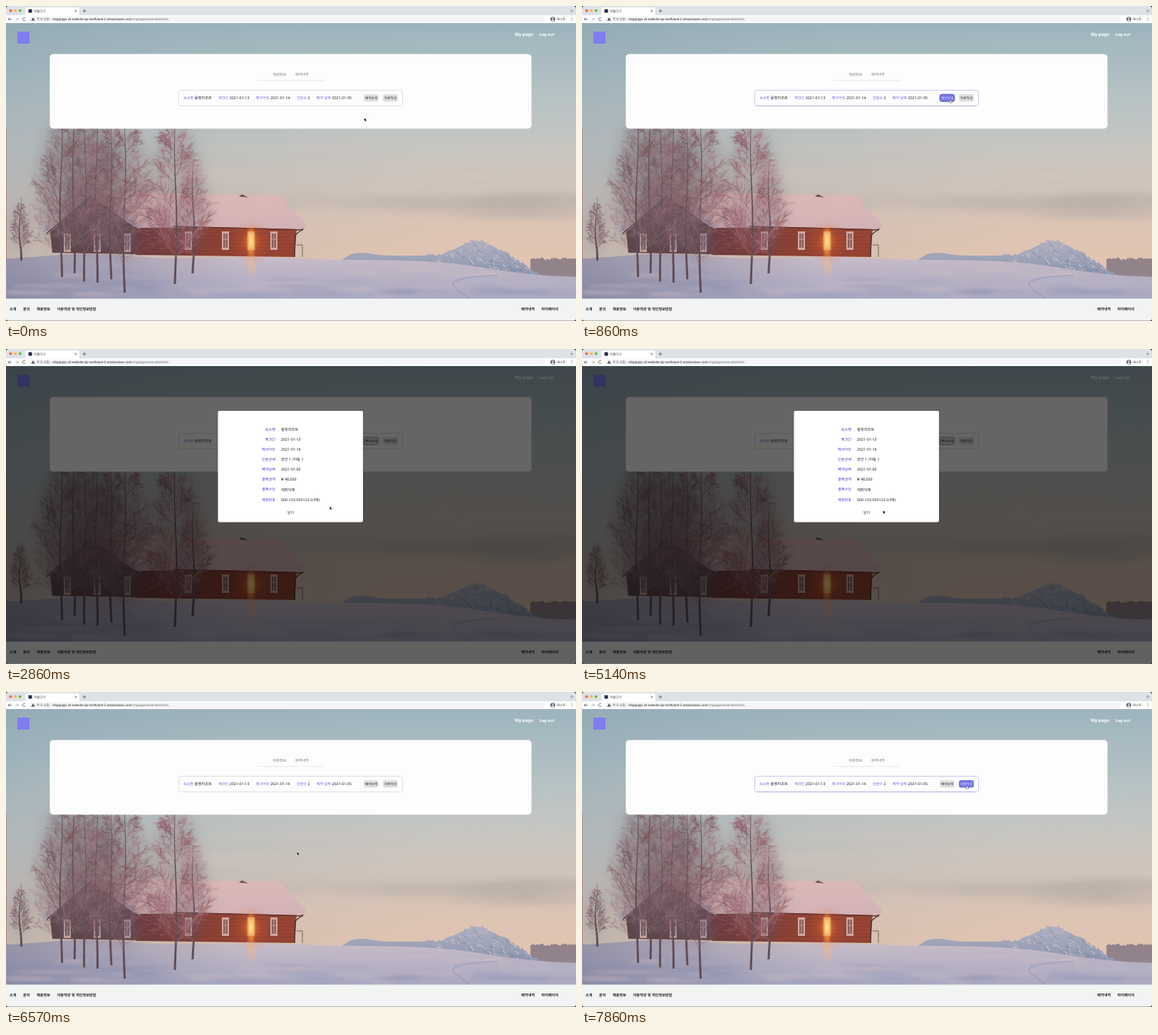
An HTML page with a canvas that plays this animation: 800x443 px, repeating every 8000 ms.

```html
<!DOCTYPE html>
<html lang="ko">
<head>
<meta charset="utf-8">
<style>
html, body { margin: 0; width: 100%; height: 100%; overflow: hidden; background: #333; }
canvas { display: block; border-radius: 4px; }
</style>
</head>
<body>
<canvas id="stage" width="800" height="443"></canvas>
<script>
const LOOP = 8000, STEP = 1000 / 7;
const SANS = '"Noto Sans", "Noto Sans CJK KR", "Noto Sans CJK", sans-serif';
const UI = 'Roboto, "Noto Sans CJK KR", "Noto Sans CJK", sans-serif';
const PURPLE = '#7476e6', LABEL = '#6a5ae0', INK = '#1a1a1a';

const screen = document.getElementById('stage').getContext('2d');
const photo = document.createElement('canvas');
photo.width = 800;
photo.height = 443;
let c = photo.getContext('2d');

let seed = 7;
const rand = () => (seed = seed * 16807 % 2147483647) / 2147483647;
const between = (a, b) => a + (b - a) * rand();
const pick = (a, b) => rand() < 0.5 ? a : b;
const bump = (x, centre, width) => Math.exp(-(((x - centre) / width) ** 2));

function gradient(x0, y0, x1, y1, ...colors) {
  const g = c.createLinearGradient(x0, y0, x1, y1);
  colors.forEach((color, i) => g.addColorStop(i / (colors.length - 1), color));
  return g;
}
function rect(x, y, w, h, fill) {
  c.fillStyle = fill;
  c.fillRect(x, y, w, h);
}
function box(x, y, w, h, r, fill, stroke, width = 0.7) {
  c.beginPath();
  c.roundRect(x, y, w, h, r);
  if (fill) { c.fillStyle = fill; c.fill(); }
  if (stroke) { c.strokeStyle = stroke; c.lineWidth = width; c.stroke(); }
}
function trace(pts) {
  c.beginPath();
  for (let i = 0; i < pts.length; i += 2) c.lineTo(pts[i], pts[i + 1]);
}
function poly(fill, ...pts) {
  trace(pts);
  c.fillStyle = fill;
  c.fill();
}
function line(color, width, ...pts) {
  trace(pts);
  c.strokeStyle = color;
  c.lineWidth = width;
  c.stroke();
}
function disc(x, y, rx, fill, ry = rx) {
  c.beginPath();
  c.ellipse(x, y, rx, ry, 0, 0, 7);
  c.fillStyle = fill;
  c.fill();
}
// Fills everything between the curve y = top(x) and the line y = bottom
function land(fill, x0, x1, bottom, top) {
  const pts = [x0, bottom];
  for (let x = x0; x <= x1; x += 2) pts.push(x, top(x));
  poly(fill, ...pts, x1, bottom);
}
function soft(blur, count, blob) {
  c.filter = `blur(${blur}px)`;
  for (let i = 0; i < count; i++) blob();
  c.filter = 'none';
}
// y is the vertical centre of the line; returns the right end of the text
function text(str, x, y, size, color = INK, { weight = 400, align = 'left', font = SANS } = {}) {
  c.font = `${weight} ${size}px ${font}`;
  c.textAlign = align;
  c.fillStyle = color;
  c.fillText(str, x, y + size * 0.36);
  return x + c.measureText(str).width;
}

// ---- winter scene ----
const ridge = x => 351 - 22 * bump(x, 660, 34) - 4 * bump(x, 500, 20)
  + 0.6 * Math.max(0, x - 705) + 0.5 * Math.max(0, 484 - x);
const snowline = x => 357 - 8 * bump(x, 110, 90) - 4 * bump(x, 340, 90) + 25 / (1 + Math.exp((680 - x) / 40));

function sky() {
  rect(0, 24, 800, 388, gradient(0, 24, 0, 365,
    '#9db4bd', '#aabcc2', '#b9c3c4', '#c6c6c2', '#d0c4bb', '#dcc4b4', '#e2c4b0'));
  rect(0, 24, 800, 388, gradient(0, 100, 600, 60, 'rgba(125,150,168,.3)', 'rgba(165,178,182,0)'));
  soft(5, 30, () => disc(between(300, 820), between(262, 296), between(60, 140), 'rgba(166,160,164,.12)', between(2, 6)));
  soft(5, 12, () => disc(between(250, 820), between(190, 245), between(60, 140), 'rgba(222,206,192,.16)', 4));
}
function hills() {
  land('#92828a', 736, 800, 390, () => between(353, 357));
  land(gradient(0, 326, 0, 375, '#b3b2c0', '#8f99b1'), 470, 752, 392,
    x => ridge(x) + between(-2, 2) * (x > 590));
  for (let i = 0; i < 110; i++) {
    const x = between(595, 735), y = between(ridge(x) + 2, 374);
    line(pick('rgba(222,204,208,.5)', 'rgba(112,124,156,.4)'), 1.5, x, y, x + between(2, 6), y + between(1, 6));
  }
}
function snow() {
  land(gradient(0, 350, 0, 412, '#c9bcc6', '#b8b2c4', '#aaa9c1'), 0, 800, 412, snowline);
  land(gradient(0, 0, 330, 0, 'rgba(104,108,138,.5)', 'rgba(104,108,138,0)'), 0, 330, 412, snowline);
  soft(2, 60, () => disc(between(0, 800), between(372, 410), between(15, 60),
    pick('rgba(222,200,204,.25)', 'rgba(132,138,174,.22)'), between(1, 3)));
  c.beginPath();
  c.moveTo(690, 379);
  c.bezierCurveTo(650, 380, 615, 385, 632, 398);
  c.lineTo(650, 411);
  c.strokeStyle = 'rgba(134,140,172,.4)';
  c.lineWidth = 2;
  c.stroke();
}
function windowFrame(x, y, glass) {
  rect(x - 5, y - 13, 10, 26, '#cfaaa3');
  rect(x - 3, y - 10, 6, 20, glass);
  line('#d2b1aa', 0.8, x, y - 10, x, y + 10);
  line('#d2b1aa', 0.8, x - 3, y - 2, x + 3, y - 2);
}
function glow(x, y, rx, ry, ...colors) {
  c.save();
  c.translate(x, y);
  c.scale(rx, ry);
  const g = c.createRadialGradient(0, 0, 0, 0, 0, 1);
  colors.forEach((color, i) => g.addColorStop(i / (colors.length - 1), color));
  rect(-1, -1, 2, 2, g);
  c.restore();
}
function house() {
  poly(gradient(180, 0, 410, 0, '#6b3b3e', '#8f4233', '#984534'), 180, 300, 408, 313, 405, 353, 182, 350);
  for (let y = 318; y < 350; y += 5) line('rgba(70,28,30,.22)', 0.7, 185, y, 406, y + 2);
  poly('#5d4349', 62, 318, 118, 266, 182, 312, 183, 349, 65, 347);
  poly(gradient(0, 264, 0, 314, '#dcb9b6', '#d2b2b6'),
    122, 261, 268, 265, 384, 267, 421, 308, 419, 314, 300, 311, 184, 312);
  line('#b3a3b0', 4, 52, 318, 118, 263, 188, 312);
  line('#4c363e', 1.5, 57, 320, 118, 267, 182, 314);
  line('#5f3431', 1.3, 235, 310, 417, 315);
  poly('#5e4c52', 327, 268, 331, 265, 340, 269);
  for (const x of [86, 128, 170]) windowFrame(x, 333, '#6b6672');
  for (const x of [256, 308, 376]) windowFrame(x, 330, '#8a5f5a');
  glow(344, 332, 30, 32, 'rgba(250,130,50,.7)', 'rgba(240,100,40,.2)', 'rgba(240,100,30,0)');
  windowFrame(344, 330, '#ffe08a');
  glow(344, 331, 8, 24, 'rgba(255,240,170,.95)', 'rgba(255,175,70,.7)', 'rgba(255,130,40,0)');
  glow(344, 362, 9, 22, 'rgba(255,180,120,.55)', 'rgba(255,180,130,0)');
  line('#43343a', 1.4, 417, 313, 406, 322, 405, 353);
  line('#5a4548', 0.8, 408, 336, 416, 336, 416, 353);
}
function branch(x, y, angle, length, depth) {
  const dx = Math.sin(angle) * length, dy = -Math.cos(angle) * length;
  c.lineWidth = 0.3 + 0.2 * depth;
  c.beginPath();
  c.moveTo(x, y);
  c.quadraticCurveTo(x + dx * 0.6, y + dy * 0.5, x + dx, y + dy);
  c.stroke();
  for (let k = 0; depth && k < 6; k++) {
    const u = between(0.25, 1);
    branch(x + dx * u, y + dy * u, angle + between(-1, 1), length * between(0.2, 0.45), depth - 1);
  }
}
function tree(x, base, height, limbs = 60) {
  const at = f => x + Math.sin(f * 7 + x) * 1.5;
  soft(9, 1, () => disc(x, base - height * 0.55, height * 0.15, 'rgba(112,96,106,.22)', height * 0.38));
  for (let f = 0; f < 1; f += 0.08)
    line('#5f4c54', 2.6 * (1 - f) + 0.4, at(f), base - f * height, at(f + 0.08), base - (f + 0.08) * height);
  for (let i = 0; i < limbs; i++) {
    const f = between(0.14, 0.95), warm = x / 240;
    c.strokeStyle = `hsla(${between(335, 362)}, ${between(8, 14) + 12 * warm}%, ${between(32, 58) + 6 * warm}%, .55)`;
    branch(at(f), base - f * height, pick(-1, 1) * between(0.35, 1.1),
      height * (0.04 + 0.26 * (1 - f)) * Math.min(1, 0.3 + 2 * f), 2);
  }
}
function paintPhoto() {
  sky();
  hills();
  snow();
  house();
  line('rgba(160,112,116,.7)', 1, 0.5, 172, 0.5, 357);
  tree(20, 358, 85, 40);
  for (let x = 166; x > 60; x -= 18) tree(x + between(-3, 3), between(375, 405), between(215, 260));
  tree(263, 376, 150, 25);
  tree(238, 391, 245, 90);
}

// ---- page ----
function chrome() {
  rect(0, 0, 800, 14, '#dee1e6');
  ['#ee6a5f', '#f5bd4f', '#61c454'].forEach((color, i) => disc(6.5 + 6.6 * i, 6.5, 2.1, color));
  box(27, 2, 76, 14, 3, '#fff');
  rect(0, 13, 800, 11, '#fff');
  rect(31.5, 4.5, 5, 5, '#2b2b52');
  text('머물다가', 39, 7, 4.6, '#444', { font: UI });
  line('#555', 0.7, 96.3, 5.5, 99.3, 8.5);
  line('#555', 0.7, 99.3, 5.5, 96.3, 8.5);
  line('#555', 0.8, 107.5, 7, 112.5, 7);
  line('#555', 0.8, 110, 4.5, 110, 9.5);
  disc(794, 7, 2.2, '#b8bcc2');
  for (const [x, d, color] of [[5.5, 1, '#555'], [15.5, -1, '#aaa']]) {
    line(color, 0.8, x - 2.3, 18.5, x + 2.3, 18.5);
    line(color, 0.8, x, 16.4, x - 2.3 * d, 18.5, x, 20.6);
  }
  c.beginPath();
  c.arc(25.5, 18.5, 2.1, 0.4, 5.6);
  c.strokeStyle = '#555';
  c.stroke();
  box(32, 14.5, 724, 8, 4, '#f4f5f6');
  poly('#555', 38, 16, 40.6, 20.6, 35.4, 20.6);
  text('주의 요함', 43, 18.5, 4.5, '#555', { font: UI });
  rect(61.6, 16, 0.6, 5, '#bbb');
  const end = text('shigojago.s3-website.ap-northeast-2.amazonaws.com', 65, 18.5, 4.65, '#222', { font: UI });
  text('/mypage/reservationinfo', end, 18.5, 4.65, '#666', { font: UI });
  disc(767.5, 18.5, 3.3, '#5f6368');
  disc(767.5, 17.4, 1.1, '#fff');
  disc(767.5, 20.3, 1.9, '#fff', 1);
  text('게스트', 773, 18.5, 4.5, '#333', { font: UI });
  for (const y of [16.5, 18.5, 20.5]) disc(794, y, 0.6, '#555');
}
function button(label, x, hot, ring) {
  box(x, 124, 21, 10.5, 3, hot ? PURPLE : '#e0e0e0', ring && '#55558a', 0.6);
  text(label, x + 10.5, 129.3, 4.6, hot ? '#e9e9ff' : INK, { weight: 500, align: 'center' });
}
function links(x, ...labels) {
  for (const label of labels) x = text(label, x, 426, 5.15, INK, { weight: 700 }) + 9.6;
}
function page(hover, focused) {
  c.drawImage(photo, 0, 0);
  rect(16, 36, 17, 17, '#7f7df0');
  text('My page', 714, 39.3, 6.2, '#fff', { weight: 600 });
  text('Log out', 748.5, 39.5, 5.6, '#fff', { weight: 600 });
  box(61.5, 67.5, 676, 105, 5, '#fdfdfd');
  text('회원정보', 374.5, 96, 5.1, '#777');
  text('예약내역', 406, 96, 5.1, '#777');
  rect(352, 104.5, 94, 0.7, '#ddd');

  box(242.5, 118.5, 314, 22, 3, null, hover.row ? '#b4b4dc' : '#d2d2d2');
  if (hover.row) {
    c.setLineDash([1.8, 1.2]);
    line('#9896ee', 0.9, 245, 140.5, 554, 140.5);
    c.setLineDash([]);
  }
  let x = 249;
  for (const [label, value] of [['숙소명', '둠벙리조트'], ['체크인', '2021-01-13'],
    ['체크아웃', '2021-01-14'], ['인원수', '2'], ['예약 날짜', '2021-01-05']]) {
    x = text(label, x, 129.5, 5.1, LABEL) + 1.5;
    x = text(value, x, 129.5, 5.3) + 9.3;
  }
  button('예약상세', 502, hover.detail, focused);
  button('리뷰작성', 529, hover.review);

  rect(0, 411.5, 800, 31.5, '#f1f4f3');
  links(5, '소개', '문의', '채용정보', '이용약관 및 개인정보방침');
  links(723, '예약내역', '마이페이지');
}
function modal(hot) {
  rect(0, 24, 800, 419, 'rgba(0,0,0,.6)');
  box(297.5, 87, 203.5, 156.5, 2, '#fff');
  [['숙소명', '둠벙리조트'], ['체크인', '2021-01-13'], ['체크아웃', '2021-01-14'],
   ['인원상세', '성인 1 /아동 1'], ['예약날짜', '2021-01-05'], ['결제금액', '₩ 48,000'],
   ['결제수단', '계좌이체'], ['계좌번호', '000-123-000123 (나래)']].forEach(([label, value], i) => {
    const y = 113 + 14.1 * i;
    text(label, 378, y, 5.15, '#3c2fd0', { align: 'right' });
    text(value, 386, y, 5.3);
  });
  if (hot) box(393, 226, 13, 9.5, 3, PURPLE);
  text('닫기', 399.5, 230.5, 5, hot ? '#fff' : INK, { align: 'center' });
}

// ---- pointer ----
// Each move: start time, end time, destination
const MOVES = [
  [140, 710, 517, 131.5], [1140, 2290, 484, 230], [2290, 2860, 454.5, 221.5],
  [4570, 5600, 400, 231], [6500, 7000, 556.7, 123], [7100, 7570, 540.5, 131.5]
];
function pointerAt(t) {
  let x = 503, y = 157.5;
  for (const [start, end, toX, toY] of MOVES) {
    const u = Math.min(1, Math.max(0, (t - start) / (end - start))), ease = u * u * (3 - 2 * u);
    x += (toX - x) * ease;
    y += (toY - y) * ease;
  }
  return [x, y];
}
function pointer(x, y, hand) {
  c.save();
  c.translate(x, y);
  c.scale(0.85, 0.85);
  if (hand) {
    box(-0.7, 0, 1.5, 4, 0.7, '#fff', '#222', 0.6);
    box(-1.6, 2.4, 4.2, 3, 1.2, '#fff', '#222', 0.6);
    rect(-0.4, 0.6, 0.9, 3, '#fff');
  } else {
    trace([0, 0, 0, 4.8, 1.1, 3.8, 2, 5.7, 2.9, 5.3, 2, 3.5, 3.5, 3.4]);
    c.closePath();
    c.strokeStyle = '#fff';
    c.lineWidth = 0.8;
    c.stroke();
    c.fillStyle = '#000';
    c.fill();
  }
  c.restore();
}

function draw(now) {
  const t = Math.floor((now % LOOP + 4) / STEP) * STEP % LOOP;
  const [x, y] = pointerAt(t), open = t > 990 && t < 6500;
  const over = (left, top, w, h) => x >= left && x <= left + w && y >= top && y <= top + h;
  const hover = open ? { close: over(393, 226, 13, 10) } : {
    row: over(242, 118, 314, 23), detail: over(502, 124, 21, 11), review: over(529, 124, 21, 11)
  };
  page(hover, t > 700 && t < 6500);
  if (open) modal(hover.close);
  chrome();
  rect(0, 442.5, 800, 0.5, '#777');
  if (!hover.close) pointer(x, y, hover.detail || hover.review);
  requestAnimationFrame(draw);
}

paintPhoto();
c = screen;
c.textRendering = 'geometricPrecision';
requestAnimationFrame(draw);
</script>
</body>
</html>
```
